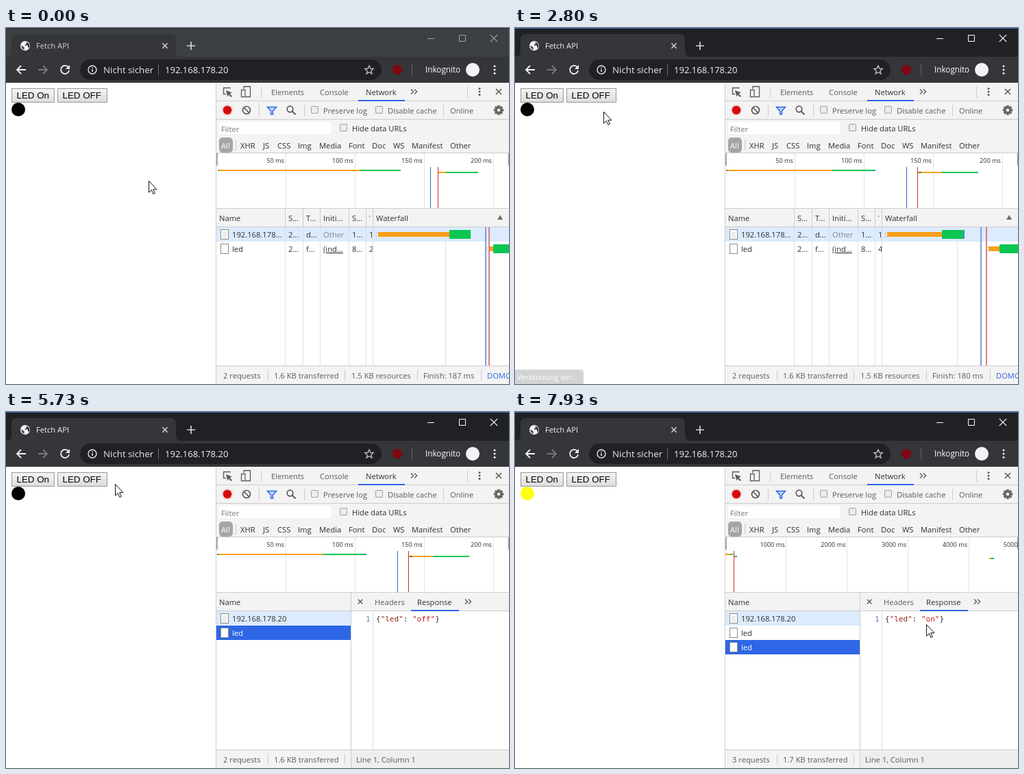
Animation, 734 px wide and 520 px high, one loop 8 s. Source, as an HTML page:

```html
<!DOCTYPE html>
<html lang="de">
<head>
<meta charset="utf-8">
<title>Fetch API</title>
<style>
html, body { margin: 0; width: 100%; height: 100%; overflow: hidden; background: #fff; }
svg { display: block; width: 734px; height: 520px; font-family: "Open Sans", "Noto Sans", sans-serif; }
text { white-space: pre; }
.btn { font: 13.33px "Liberation Sans", Arial, sans-serif; }
.code { font: 11px "DejaVu Sans Mono", monospace; }
</style>
</head>
<body>
<svg id="stage" viewBox="0 0 734 520"></svg>
<script>
const stage = document.getElementById('stage');
const LOOP = 8000, FRAME = 200 / 3;
const INK = '#303030', GREY = '#5a5a5a', LINE = '#ccc', BAR = '#f3f3f3';
const BLUE = '#2e66e6', ORANGE = '#f9a01b', GREEN = '#0ac653';
const READY = '#2f62c4', DONE = '#c0302b';
// moments of change
const FOCUS = 1800, RELOAD = 2270, CLEAR = 2400, LOADED = 2530, HOVER = 4600, OPEN = 4930,
      BLUR = 6460, SENT = 6530, LIT = 6600, PICK = 7400;

const layers = [];
function add(markup, from = 0, to = LOOP) {
  const g = document.createElementNS('http://www.w3.org/2000/svg', 'g');
  g.innerHTML = markup;
  stage.append(g);
  layers.push({ g, from, to });
}
const rect = (x, y, w, h, fill, more = '') => `<rect x="${x}" y="${y}" width="${w}" height="${h}" fill="${fill}" ${more}/>`;
const text = (x, y, s, fill = INK, size = 11.2, more = '') => `<text x="${x}" y="${y}" fill="${fill}" font-size="${size}" ${more}>${s}</text>`;
const disc = (x, y, r, fill, more = '') => `<circle cx="${x}" cy="${y}" r="${r}" fill="${fill}" ${more}/>`;
const path = (d, stroke, width = 1, fill = 'none') => `<path d="${d}" stroke="${stroke}" stroke-width="${width}" fill="${fill}"/>`;
const cross = (x, y, r, stroke, width) => path(`M${x - r} ${y - r}l${2 * r} ${2 * r}m0 ${-2 * r}l${-2 * r} ${2 * r}`, stroke, width);
const vline = (x, y, h, fill = LINE) => rect(x, y, 1, h, fill);
const words = (y, fill, list) => list.map(([x, s]) => text(x, y, s, fill)).join('');
const dots = (x, y, gap, fill) => [-gap, 0, gap].map(d => disc(x, y + d, 1.5, fill)).join('');
const box = (x, y) => rect(x + .5, y + .5, 10, 10, '#ececec', 'rx="1.5" stroke="#a0a0a0"');

// window frame
const controls = c => path('M615 15.5h10M661.5 10.5h9v9h-9z', c) + cross(712, 15, 5.2, c, 1.2);
add(rect(0, 0, 734, 80, '#3c4043') + rect(0, 0, 734, 1, '#2b2d30') + controls('#a0a2a5'), 0, FOCUS);
add(rect(0, 0, 734, 80, '#202124') + rect(0, 0, 734, 1, '#2c6fbd') + controls('#fff'), FOCUS);
add(`<path d="M0 42Q8 42 8 34V17Q8 9 16 9H240Q248 9 248 17V34Q248 42 256 42H734V80H0Z" fill="#35363a"/>` +
  cross(232, 26, 3.7, '#cfd1d4', 1.5) + path('M264 26h12M270 20v12', '#d5d6d8', 1.7) +
  rect(108, 46, 440, 30, '#202124', 'rx="15"') +
  path('M29 61H16M22 55l-6 6 6 6', '#f1f3f4', 1.8) +
  path('M47 61h13M54 55l6 6-6 6', '#77797c', 1.8) +
  disc(126, 61, 6, 'none', 'stroke="#e8eaed" stroke-width="1.4"') + path('M126 60v4.3M126 57.2v1.6', '#e8eaed', 1.5) +
  text(142, 66, 'Nicht sicher', '#e8eaed', 13.3) + vline(222, 53, 16, '#6b6d70') +
  text(232, 66, '192.168.178.20', '#f1f3f4', 13.05) +
  path('M530 55l1.8 4.1 4.4.4-3.3 3 1 4.3-3.9-2.3-3.9 2.3 1-4.3-3.3-3 4.4-.4z', '#c4c7c9', 1.3) +
  disc(571, 61, 7, '#800610') + vline(592, 53, 16, '#5f6368') +
  text(612, 65, 'Inkognito', '#fff', 11.7) + disc(681, 61, 10, '#f1f3f4') + dots(713, 61, 5.3, '#f1f3f4'));
add(text(44, 30, 'Fetch API', '#d0d2d5'), 0, FOCUS);
add(text(44, 30, 'Fetch API', '#f1f3f4'), FOCUS);

const idle = disc(28, 26, 7, '#f1f3f4') +
  `<path d="M22.5 25l4 3.5v3.5q-4-2-4-7zM27 21h3v2.5h-2v2h4v2.5l2 1q2-6-4-8.5z" fill="#35363a"/>` +
  path('M91 57.5A6 6 0 1 0 92 62', '#f1f3f4', 1.8) + `<path d="M93 54v6h-6z" fill="#f1f3f4"/>`;
add(idle, 0, RELOAD);
add(`<g id="spin">${path('M28 19.5a6.5 6.5 0 1 1-6.5 6.5', '#8ab4f8', 2)}</g>` + cross(86, 61, 5, '#f1f3f4', 1.8), RELOAD, LOADED);
add(idle, LOADED);

// page
const button = (id, x, w, label) =>
  rect(x + .5, 88.5, w - 1, 20, 'url(#face)', `id="${id}"`) +
  `<text class="btn" x="${x + 7.5}" y="103">${label}</text>`;
add('<defs><linearGradient id="face" x2="0" y2="1"><stop stop-color="#f4f4f4"/><stop offset="1" stop-color="#dcdcdc"/></linearGradient></defs>' +
  rect(0, 80, 306, 440, '#fff') + button('on', 8, 63, 'LED On') + button('off', 75, 73, 'LED OFF'));
add(disc(18, 119, 10, '#000'), 0, LIT);
add(disc(18, 119, 10, '#ffff0f'), LIT);
add(`<g id="bubble"><path d="M0 499H96Q100 499 100 503V520H0Z" fill="#323639"/>${text(3, 514, 'Verbindung wir...', '#fff')}</g>`, RELOAD, 2870);

// developer tools
const gear = Array.from({ length: 8 }, (_, i) => `<path d="M717.2-7.2h3.6v4h-3.6z" transform="translate(0 120) rotate(${i * 45} 719 0)" fill="#666"/>`).join('');
add(rect(306, 80, 428, 440, LINE) + rect(307, 80, 427, 26, BAR) + rect(307, 107, 427, 26, BAR) +
  rect(307, 134, 427, 48, BAR) + rect(311, 137, 163, 18, '#fff') +
  rect(307, 183, 427, 80, '#fff') + rect(307, 264, 427, 26, BAR) +
  rect(307, 291, 427, 202, '#fff') + rect(307, 494, 427, 26, BAR) +
  path('M327 88.5V87.5H317.5V96.5H321', GREY, 1.3) + `<path d="M321 91l9 3.5-3.5 1.5 3.5 3.5-1.5 1.5-3.5-3.5-1.5 3z" fill="${GREY}"/>` +
  path('M347 89V85.5H356.5V100.5H350M343.5 90.5h5.5v10h-5.5z', GREY, 1.3) +
  vline(372, 85, 17) + words(98, GREY, [[387, 'Elements'], [458, 'Console']]) + text(525, 98, 'Network') +
  rect(514, 105, 68, 2, BLUE) + path('M591 89.5l3.5 3.5-3.5 3.5M596 89.5l3.5 3.5-3.5 3.5', GREY, 1.4) +
  vline(673, 85, 17) + dots(691, 93, 4.5, GREY) + cross(719, 93, 4, GREY, 1.6) +
  disc(323, 120, 8, '#f0cccc') + disc(323, 120, 6.2, '#d50b0b') +
  disc(351, 120, 5.5, 'none', `stroke="${GREY}" stroke-width="1.7"`) + path('M347 116l8 8', GREY, 1.7) +
  vline(369, 112, 17) + path('M381.5 115.5h13l-5 5.5v5h-3v-5z', BLUE, 1.5, '#c5d6f8') +
  disc(414.5, 118.5, 4.3, 'none', `stroke="${GREY}" stroke-width="1.7"`) + path('M417.5 121.5l5 5', GREY, 2) +
  vline(435, 112, 17) + box(445, 114) + box(539, 114) + box(487, 140) + vline(638, 112, 17) +
  words(125, GREY, [[463, 'Preserve log'], [557, 'Disable cache'], [648, 'Online']]) +
  gear + disc(719, 120, 3.8, 'none', 'stroke="#666" stroke-width="3"') +
  text(314, 152, 'Filter', '#777') + text(505, 151, 'Hide data URLs') +
  rect(311, 160, 20, 22, '#a5a5a5', 'rx="5"') + text(314, 176, 'All', '#fff') + vline(335, 163, 16) +
  words(176, INK, [[342, 'XHR'], [375, 'JS'], [396, 'CSS'], [426, 'Img'], [457, 'Media'], [500, 'Font'],
    [534, 'Doc'], [565, 'WS'], [592, 'Manifest'], [648, 'Other']]) +
  text(311, 282, 'Name'));

// overview strip
const ticks = (gap, unit) => [1, 2, 3, 4, 5].map(i => vline(Math.floor(307 + gap * i), 183, 80, '#e4e4e4') +
  text(305 + gap * i, 197, `${unit * i} ms`, INK, 9.2, 'text-anchor="end"')).join('');
const strip = (y, a, b, c) => rect(a, y, b - a, 2, ORANGE) + rect(b, y, c - b, 2, GREEN);
add(ticks(101, 50) + rect(309, 207, 3, 2, '#7b8a55') + strip(207, 311, 516, 576) + strip(210, 630, 642, 689) +
  vline(619, 203, 60, READY) + vline(630, 203, 60, DONE), 0, CLEAR);
add(ticks(101, 50), CLEAR, LOADED);
add(ticks(101, 50) + strip(207, 309, 463, 524) + rect(524, 207, 2, 2, '#3b8fd6') + rect(308, 207, 3, 2, '#7b8a55') +
  strip(210, 587, 623, 676) + rect(589, 210, 4, 2, '#6b7a4a') + vline(571, 203, 60, READY) + vline(587, 203, 60, DONE), LOADED, SENT);
add(ticks(88.8, 1000) + strip(207, 307, 314, 318) + strip(210, 319, 321, 324) +
  strip(213, 692, 694, 699) + vline(319, 203, 60, DONE), SENT);
add(rect(307, 183, 2, 18, '#a8a8a8') + rect(733, 183, 1, 18, '#888'));

// request list
const page = y => rect(313.5, y + 3.5, 11, 14, '#fff', 'stroke="#8a8a8a"');
const lined = page(291) + path('M316 299.5h6M316 302.5h6M316 305.5h6', '#c5c5c5');
const stem = rect(307, 291, 229, 21, '#dcebfd') + lined;
const columns = [407, 433, 458, 500, 525, 535].map(x => vline(x, 264, 27) + vline(x, 291, 202, '#e1e1e1')).join('');
const bar = (y, a, b, c) => rect(a - 2.5, y + 8.5, 3, 5, '#fff', 'stroke="#ccc"') +
  rect(a, y + 7, b - a, 7, ORANGE) + rect(b, y + 4, c - b, 13, GREEN, 'rx="1"');
const table = columns +
  words(282, INK, [[412, 'S...'], [438, 'T...'], [463, 'Initi...'], [505, 'S...'], [540, 'Waterfall']]) +
  rect(530, 274, 1, 2, GREY) + `<path d="M717 280h8l-4-7z" fill="#6e6e6e"/>`;
const cells = last => stem + page(312) +
  words(306, INK, [[330, '192.168.178...'], [412, '2...'], [438, 'd...'], [505, '1...'], [530, '1']]) + text(463, 306, 'Other', '#888') +
  words(327, INK, [[330, 'led'], [412, '2...'], [438, 'f...'], [505, '8...'], [530, last]]) +
  text(463, 327, '(ind...', INK, 11.2, 'text-decoration="underline"');
const waterfall = (grid, first, second, blue, red) =>
  rect(535, 291, 199, 21, '#dcebfd') + vline(grid, 291, 202, '#e2e2e2') +
  bar(291, ...first) + bar(312, ...second) + rect(blue, 291, 2, 202, '#7f9fdc') + rect(red, 291, 2, 202, '#d98080');
const footer = (count, size) => words(512, GREY, [[317, count + ' requests'], [391, size + ' KB transferred']]) +
  vline(382, 499, 16) + vline(494, 499, 16);
const totals = ms => words(512, GREY, [[504, '1.5 KB resources'], [609, `Finish: ${ms} ms`]]) +
  vline(600, 499, 16) + vline(693, 499, 16) + text(702, 512, 'DOMContentLoaded', BLUE);
// the last column cuts off the one before it
const cut = (fill, y) => rect(535, y, 199, 21, fill);
add(cells('2') + cut('#fff', 312) + waterfall(641, [543, 647, 678], [705, 711, 736], 699, 704) +
  table + footer(2, '1.6') + totals(187), 0, CLEAR);
add(table, CLEAR, LOADED);
add(rect(307, 312, 427, 21, '#f0f6fe'), HOVER, OPEN);
const second = cells('4'), chart = waterfall(645, [543, 623, 654], [691, 707, 736], 679, 687) +
  rect(654, 295, 2, 13, '#3b8fd6') + table + footer(2, '1.6') + totals(180);
add(second + cut('#fff', 312) + chart, LOADED, HOVER);
add(second + cut('#f0f6fe', 312) + chart, HOVER, OPEN);
add(rect(360, 325, 151, 26, '#000', 'opacity=".12"') + rect(358.5, 323.5, 151, 25, '#f4f4f4', 'stroke="#c4c4c4"') +
  text(367, 341, 'http://192.168.178.20/led', '#444'), 4660, 4870);

// list with detail pane
const row = (y, fill, ink = INK) => rect(307, y, 196, 21, fill) + page(y) + text(330, y + 15, 'led', ink);
add(stem + text(330, 306, '192.168.178.20') + rect(503, 264, 231, 26, BAR) + rect(503, 291, 231, 202, '#fff') +
  vline(503, 264, 256) + vline(535, 291, 202, '#ddd') + cross(517, 277, 3.3, GREY, 1.4) +
  text(538, 282, 'Headers', GREY) + text(600, 282, 'Response') + rect(591, 289, 70, 2, BLUE) +
  path('M670 273.5l3.5 3.5-3.5 3.5M675 273.5l3.5 3.5-3.5 3.5', GREY, 1.4) +
  text(511, 512, 'Line 1, Column 1', GREY), OPEN);
add(footer(2, '1.6'), OPEN, SENT);
add(footer(3, '1.7'), SENT);
add(rect(504, 494, 230, 26, '#eee') + text(511, 512, 'Line 1, Column 1', GREY), OPEN);
add(row(312, BLUE, '#fff'), OPEN, BLUR);
add(row(312, '#d4d4d4'), BLUR, PICK);
add(row(333, '#f5f5f5'), SENT, PICK);
add(row(312, '#fff') + row(333, BLUE, '#fff'), PICK);
const json = value => `<text class="code" x="525" y="306" fill="#7080b0">1</text><text class="code" x="540" y="306" fill="#333">{<tspan fill="#8f2a1c">"led"</tspan>: <tspan fill="#c41a16">"${value}"</tspan>}</text>`;
add(json('off'), 5000, PICK + 60);
add(json('on'), PICK + 60);

add(`<path id="cursor" d="M.5.5V17.2L4.3 13.6 6.9 19.5 9.3 18.4 6.7 12.7H12Z" fill="#fff" stroke="#111"/>`);

// time, x, y of the pointer tip
const track = [
  [0, 208, 223], [200, 181, 329], [670, 181, 329], [1070, 158, 393], [1730, 158, 393], [1800, 162, 393],
  [1870, 162, 393], [1930, 165, 393], [2200, 165, 393], [2800, 129, 122], [3070, 114, 103], [3130, 111, 104],
  [3200, 111, 104], [3400, 40, 101], [3530, 40, 101], [3930, 105, 101], [4400, 105, 101], [4670, 355, 333],
  [4735, 355, 333], [4870, 348, 316], [5270, 348, 316], [5730, 159, 105], [6130, 112, 100], [6400, 40, 100],
  [6530, 40, 100], [6665, 46, 113], [7000, 325, 383], [7330, 345, 345], [7470, 345, 345], [7870, 582, 319],
  [7930, 600, 310]
];
function pointer(t) {
  const i = track.findIndex(k => k[0] > t);
  if (i < 0) return track.at(-1).slice(1);
  const [a, x, y] = track[i - 1], [b, u, v] = track[i];
  const p = (t - a) / (b - a), e = p * p * (3 - 2 * p);
  return [Math.round(x + (u - x) * e), Math.round(y + (v - y) * e)];
}
const clamp = v => Math.max(0, Math.min(1, v));
const get = id => document.getElementById(id);
const cursor = get('cursor'), bubble = get('bubble'), spin = get('spin'), on = get('on'), off = get('off');

function draw(now) {
  const t = Math.floor((now % LOOP + 4) / FRAME) * FRAME % LOOP;
  for (const { g, from, to } of layers) g.style.display = t >= from && t < to ? '' : 'none';
  const [x, y] = pointer(t);
  cursor.setAttribute('transform', `translate(${x} ${y})`);
  const edge = (a, b) => x >= a && x < b && y >= 88 && y < 114 ? '#666' : '#999';
  on.setAttribute('stroke', edge(8, 71));
  off.setAttribute('stroke', edge(75, 148));
  bubble.setAttribute('opacity', clamp(Math.min((t - 2330) / 130, (2853 - t) / 250)));
  spin.setAttribute('transform', `rotate(${t * .4} 28 26)`);
  requestAnimationFrame(draw);
}
requestAnimationFrame(draw);
</script>
</body>
</html>
```
